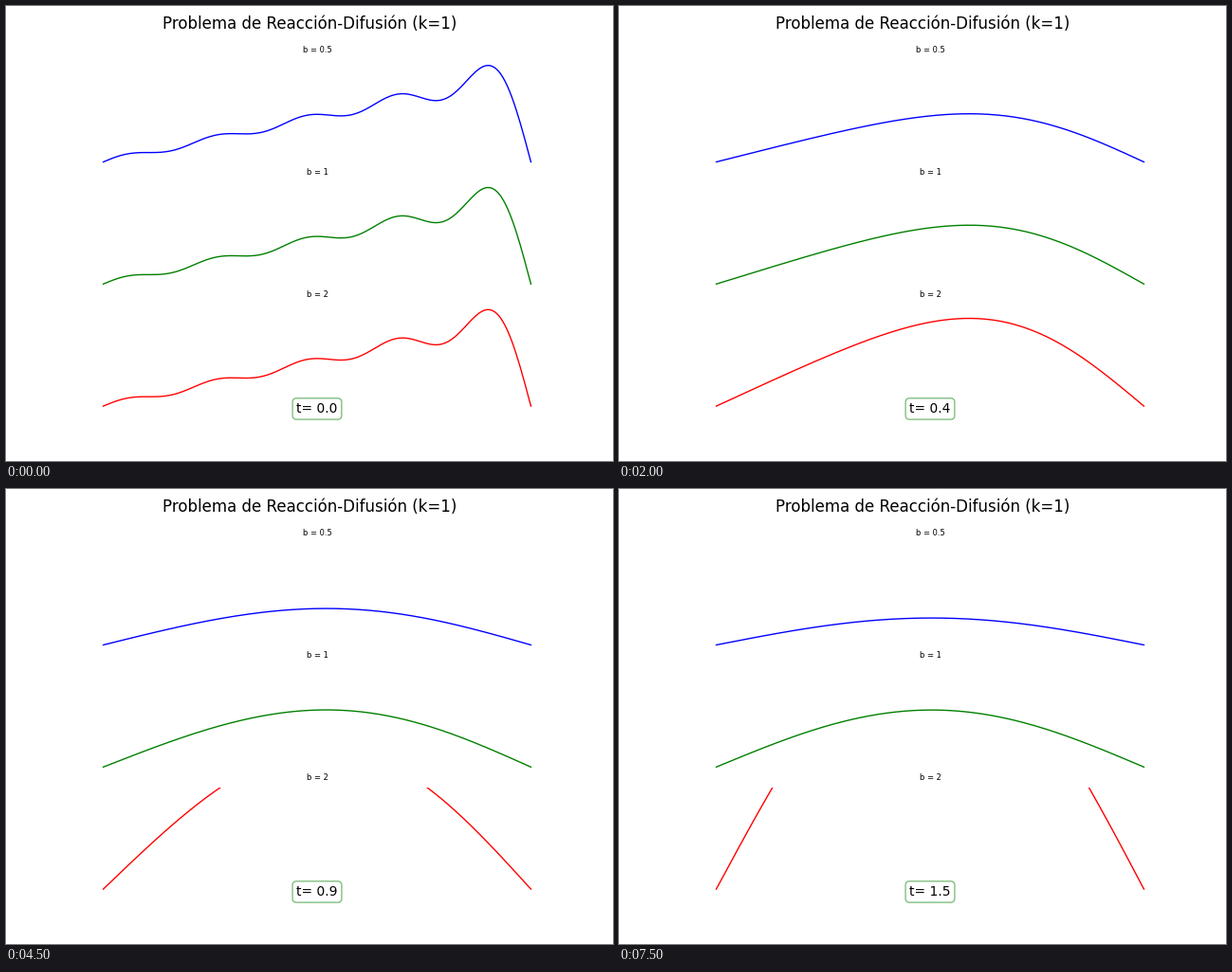
Recreate the animation shown at these times as a matplotlib script. Size 640 by 480 pixels, loop 8 s.

```python
import numpy as np
import matplotlib.pyplot as plt
from matplotlib.animation import FuncAnimation

K = 1
RATES = (0.5, 1, 2)
COLORS = ("blue", "green", "red")
FRAMES = 16
DT = 0.1

x = np.linspace(0, np.pi, 201)
modes = np.arange(1, 10)[:, None]
# sine series of u(x, 0) = x on [0, pi]
basis = 2 * (-1.0) ** (modes + 1) / modes * np.sin(modes * x)


def solution(t, b):
    """Solve u_t = K u_xx + b u with zero ends."""
    return (np.exp((b - K * modes**2) * t) * basis).sum(axis=0)


fig, axes = plt.subplots(3, 1, figsize=(6.4, 4.8), dpi=100)
fig.subplots_adjust(left=0.125, right=0.9, bottom=0.11, top=0.88, hspace=0.15)
fig.suptitle(f"Problema de Reacción-Difusión (k={K})", fontsize=12)

peak = solution(0, 0).max()
lines = []
for ax, b, color in zip(axes, RATES, COLORS):
    ax.axis("off")
    ax.set_title(f"b = {b}", fontsize=6)
    ax.set_xlim(-0.05 * np.pi, 1.05 * np.pi)
    ax.set_ylim(-0.05 * peak, 1.05 * peak)
    lines += ax.plot(x, solution(0, b), color=color, lw=1)

clock = axes[-1].text(
    0.5, 0.02, "t= 0.0", transform=axes[-1].transAxes,
    fontsize=10, ha="center", va="center",
    bbox=dict(boxstyle="round", facecolor="white", edgecolor="green", alpha=0.5),
)


def update(frame):
    t = frame * DT
    for line, b in zip(lines, RATES):
        line.set_ydata(solution(t, b))
    clock.set_text(f"t= {t:.1f}")
    return [*lines, clock]


anim = FuncAnimation(fig, update, frames=FRAMES, interval=500, repeat=True)
plt.show()
```
